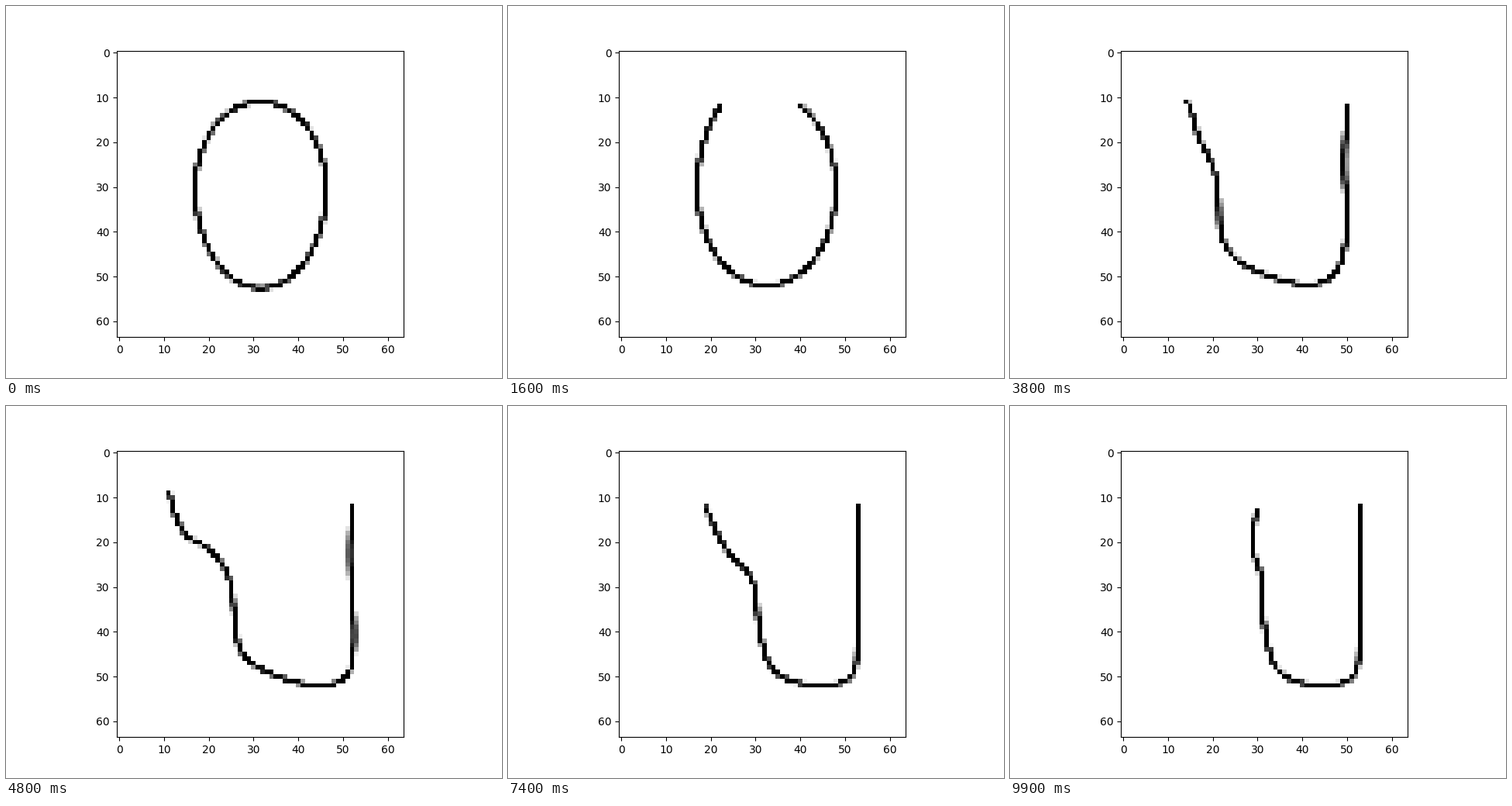
Write a matplotlib script that moves like this. It is 640 by 480 pixels and loops after 10 s.

```python
import numpy as np
import matplotlib.pyplot as plt
from matplotlib.animation import FuncAnimation

SIZE, FRAMES, STEP = 64, 100, 100
HALF = 200  # samples per half stroke


def even(p):
    """Space the points of a curve evenly along its length."""
    s = np.r_[0, np.cumsum(np.hypot(*np.diff(p, axis=0).T))]
    u = np.linspace(0, s[-1], HALF)
    return np.c_[np.interp(u, s, p[:, 0]), np.interp(u, s, p[:, 1])]


def curve(*points):
    """Quadratic spline that rounds the corners of a polygon."""
    p = np.array(points, float)
    joints = (p[1:] + p[:-1]) / 2
    joints[0], joints[-1] = p[0], p[-1]
    t = np.linspace(0, 1, 40)[:, None]
    return even(np.concatenate([
        (1 - t) ** 2 * a + 2 * t * (1 - t) * c + t ** 2 * b
        for a, c, b in zip(joints[:-1], p[1:-1], joints[1:])]))


def arc(cx, rx, top, bottom, gap=0.0, cy=30.3):
    """Side of an egg from the top to the bottom; rx < 0 is the left side."""
    a = np.linspace(gap, np.pi, 120)
    ry = np.where(a < np.pi / 2, cy - top, bottom - cy)
    return even(np.c_[cx + rx * np.sin(a), cy - ry * np.cos(a)])


def stroke(left, right):
    return np.r_[left, right]


def egg(cx, rx, top, bottom):
    return stroke(arc(cx, -rx, top, bottom), arc(cx, rx, top, bottom)[::-1])


stem = curve((45, 52), (52, 52), (53, 42), (53, 12))

horseshoe = stroke(arc(32.5, -15.5, 5.8, 52, 0.73),
                   arc(32.5, 15.5, 9.4, 52, 0.5)[::-1])
wide_u = stroke(
    curve((16.6, 12.4), (19.2, 13.5), (18.9, 28), (17.9, 33), (17.8, 47.5),
          (38, 52)),
    curve((38, 52), (45, 50.5), (48.3, 38), (47, 24), (48.5, 12)))
slope = stroke(
    curve((11.3, 9), (13, 18), (20, 21), (25, 27.5), (25.8, 38),
          (27.2, 46.5), (40, 52), (45, 52)),
    curve((45, 52), (51, 52), (53, 42), (51, 22), (52.1, 12)))
hook = stroke(
    curve((19.8, 12.6), (15.5, 24), (26, 28), (31.7, 33.5), (32, 40),
          (34.5, 52), (45, 52)), stem)
ramp = stroke(
    curve((16, 12.5), (18, 22), (30, 27), (31, 38), (33, 52), (45, 52)), stem)
curl = stroke(
    curve((26.2, 12.4), (29.5, 14.5), (31.8, 25), (29.4, 33), (30.2, 43),
          (38.5, 52), (45, 52)), stem)
narrow_u = stroke(
    curve((29.9, 12.8), (28.2, 21), (31.2, 27), (31, 38), (34.5, 52),
          (45, 52)), stem)

# Poses and the times (ms) at which the stroke reaches them.
timeline = [(0, egg(31.6, 14.6, 11, 52.6)), (900, egg(32, 15, 10.6, 52.4)),
            (1600, horseshoe), (2900, wide_u), (4800, slope), (6200, hook),
            (6900, ramp), (8600, curl), (9900, narrow_u)]

cells = np.arange(SIZE)


def path_at(t):
    for (t0, a), (t1, b) in zip(timeline, timeline[1:]):
        if t <= t1:
            u = (t - t0) / (t1 - t0)
            return a * (1 - u) + b * u


def picture(t):
    """Rasterise the stroke, one cell wide with soft edges."""
    x, y = path_at(t).T
    dx2 = (cells[:, None] - x) ** 2
    dy2 = (cells[:, None] - y) ** 2
    dist = np.sqrt((dy2[:, None, :] + dx2[None, :, :]).min(axis=2))
    return 1 - np.clip((0.72 - dist) / 0.3, 0, 1)


fig, ax = plt.subplots(figsize=(6.4, 4.8), dpi=100)
image = ax.imshow(picture(0), cmap="gray", vmin=0, vmax=1)


def update(i):
    image.set_data(picture(i * STEP))
    return [image]


anim = FuncAnimation(fig, update, frames=FRAMES, interval=STEP, repeat=True)
plt.show()
```
